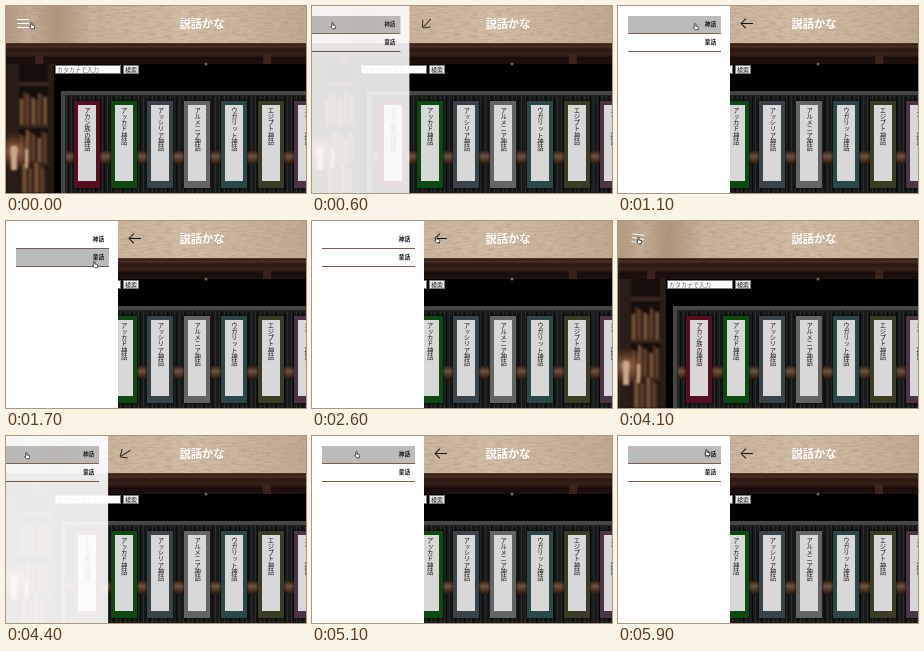
An HTML page that plays this animation: 300 by 187 pixels, repeating every 6 s.

```html
<!DOCTYPE html>
<html lang="ja">
<head>
<meta charset="utf-8">
<title>説話かな</title>
<style>
@property --p { syntax: "<number>"; inherits: true; initial-value: 0; }
html, body { margin: 0; width: 100%; height: 100%; overflow: hidden; background: #000; }
#stage {
  position: relative; width: 300px; height: 187px; overflow: hidden;
  font-family: "Noto Sans CJK JP", "Noto Sans CJK", sans-serif;
  animation: open 6s infinite;
}
#stage > * { position: absolute; }
#scene { left: 0; top: 0; }

h1 {
  left: 146px; top: 9px; width: 100px; margin: 0;
  font-size: 11.2px; line-height: 17px; text-align: center; color: #fff;
}

.field, .button {
  top: 59px; height: 9px; box-sizing: border-box; overflow: hidden;
  border: 1px solid #777; background: #fff;
  font-size: 6px; line-height: 7px; white-space: nowrap;
}
.field { left: 49px; width: 66px; padding-left: 1px; color: #666; }
.button { left: 117px; width: 16px; background: #eee; text-align: center; color: #111; }

.book {
  top: 95px; width: 26px; height: 87px; box-sizing: border-box;
  border: 4px solid var(--c); border-bottom-width: 7px;
  background: #d9d8d9; box-shadow: 0 0 2px 1px #0009;
  writing-mode: vertical-rl; line-height: 18px; padding-top: 2px;
  font-size: 6.3px; white-space: nowrap; color: #171717;
}

#menu {
  left: 0; top: 0; width: 112px; height: 187px; background: #fff;
  opacity: var(--p); transform: translateX(calc((var(--p) - 1) * 112px));
}
.item {
  position: absolute; left: 10px; width: 88px; height: 17px; padding-right: 5px;
  border-bottom: 1px solid #75604f;
  font-size: 5.6px; font-weight: 700; line-height: 17px; text-align: right; color: #181818;
}
.first { top: 10px; animation: hover1 6s infinite; }
.second { top: 28px; animation: hover2 6s infinite; }

#icon {
  left: 11px; top: 11px; width: 12px; height: 12px;
  color: color-mix(in srgb, #111 calc(var(--p) * 100%), #fff);
  transform: translateX(calc(var(--p) * 112px)) rotate(calc(var(--p) * 360deg));
}
#icon i {
  position: absolute; left: 0; top: 5.5px; width: 12px; height: 1px;
  background: currentColor; transform-origin: 0 50%;
  transform: translateY(calc(var(--s) * (1 - var(--p)) * 4px))
    rotate(calc(var(--s) * var(--p) * 45deg))
    scaleX(calc(1 - var(--p) * .42 * var(--s) * var(--s)));
}

#cursor { left: 0; top: 0; animation: point 6s infinite ease-in-out; }

@keyframes open {
  0%, 5.2% { --p: 0; animation-timing-function: ease; }
  13.53%, 54.67% { --p: 1; animation-timing-function: ease; }
  63%, 68% { --p: 0; animation-timing-function: ease; }
  76.33%, 100% { --p: 1; }
}
@keyframes hover1 {
  0%, 6.5% { background: #bbb0; }
  10%, 23% { background: #bbb; }
  27%, 36% { background: #bbb0; }
  39%, 40.5% { background: #bbb; }
  44%, 69% { background: #bbb0; }
  73%, 100% { background: #bbb; }
}
@keyframes hover2 {
  0%, 23% { background: #bbb0; }
  27%, 36% { background: #bbb; }
  40%, 100% { background: #bbb0; }
}
@keyframes point {
  0% { transform: translate(23px, 16px); }
  5%, 13% { transform: translate(18px, 16px); }
  20% { transform: translate(82px, 17px); }
  27%, 33% { transform: translate(86px, 40px); }
  38% { transform: translate(88px, 17px); }
  43% { transform: translate(122px, 15px); }
  50%, 59% { transform: translate(127px, 16px); }
  67%, 78% { transform: translate(18px, 16px); }
  95%, 100% { transform: translate(86px, 13px); }
}
</style>
</head>
<body>
<div id="stage">
  <svg id="scene" width="300" height="187">
    <defs>
      <linearGradient id="cloth">
        <stop offset="0" stop-color="#b39a82"/>
        <stop offset=".08" stop-color="#c5ae97"/>
        <stop offset=".17" stop-color="#ae957d"/>
        <stop offset=".28" stop-color="#c9b39b"/>
        <stop offset=".6" stop-color="#d2bfa8"/>
        <stop offset="1" stop-color="#c2ab93"/>
      </linearGradient>
      <linearGradient id="wood" x2="0" y2="1">
        <stop offset="0" stop-color="#1b0e0a"/>
        <stop offset=".2" stop-color="#4b3026"/>
        <stop offset=".4" stop-color="#2b1812"/>
        <stop offset=".7" stop-color="#38221a"/>
        <stop offset="1" stop-color="#120907"/>
      </linearGradient>
      <linearGradient id="log" x2="0" y2="1">
        <stop offset="0" stop-color="#2e2019"/>
        <stop offset=".4" stop-color="#74543d"/>
        <stop offset="1" stop-color="#241811"/>
      </linearGradient>
      <radialGradient id="glow">
        <stop offset="0" stop-color="#e8b283"/>
        <stop offset=".3" stop-color="#a0694a" stop-opacity=".7"/>
        <stop offset="1" stop-color="#6b3a24" stop-opacity="0"/>
      </radialGradient>
      <pattern id="planks" width="9" height="8" patternUnits="userSpaceOnUse">
        <path fill="#191a1a" d="M0 0h9v8h-9z"/>
        <path stroke="#2b2d2d" d="M2.5 0v8M6.5 0v8"/>
        <path stroke="#0c0c0c" d="M8.5 0v8"/>
      </pattern>
      <filter id="weave" x="0" y="0" width="1" height="1">
        <feTurbulence type="fractalNoise" baseFrequency=".12 .6" numOctaves="2" seed="4"/>
        <feColorMatrix values="0 0 0 0 .38  0 0 0 0 .27  0 0 0 0 .17  1.6 0 0 0 -.6"/>
      </filter>
      <filter id="soft"><feGaussianBlur stdDeviation="1"/></filter>
    </defs>

    <path fill="#160e0b" d="M0 0h300v187H0z"/>
    <g id="shelf" filter="url(#soft)">
      <path fill="#2c1b14" d="M0 57h13v130H0zM42 57h6v130h-6z"/>
      <path fill="#3c261b" d="M13 76h30v4H13zM13 118h30v4H13zM13 156h30v4H13z"/>
    </g>
    <circle cx="8" cy="145" r="20" fill="url(#glow)"/>
    <path fill="#c9a789" filter="url(#soft)" d="M5 140h6v24H5zM19 143h3v19h-3z"/>

    <path fill="url(#wood)" d="M0 37h300v16H0z"/>
    <path fill="#1d100c" d="M0 53h300v5H0z"/>
    <path fill="#3a241b" d="M29 49h8v9h-8zM257 49h8v9h-8z"/>
    <path d="M48 58h252v129H48z"/>
    <circle cx="200" cy="58" r="1.5" fill="#776255"/>

    <path fill="url(#planks)" d="M55 85h245v102H55z"/>
    <path fill="url(#log)" d="M60 145h240v13H60z"/>
    <path fill="none" stroke="#454747" stroke-width="4" d="M300 87H57v100"/>
    <path fill="none" stroke="#222" d="M300 89.5H59.5v98"/>

    <path fill="url(#cloth)" d="M0 0h300v37H0z"/>
    <path filter="url(#weave)" opacity=".6" d="M0 0h300v37H0z"/>
    <path stroke="#6f5139" opacity=".6" d="M0 37.5h300"/>
  </svg>

  <h1>説話かな</h1>
  <div class="field">カタカナで入力</div>
  <div class="button">検索</div>

  <div id="menu">
    <div class="item second">童話</div>
    <div class="item first">神話</div>
  </div>
  <div id="icon"><i style="--s:-1"></i><i style="--s:0"></i><i style="--s:1"></i></div>
  <svg id="cursor" width="7" height="8">
    <path fill="#fff" stroke="#111" stroke-width=".7"
      d="M1.8 4.4V1a.6.6 0 0 1 1.2 0v2l2.2.5q.6.2.5.9l-.4 2.4H2.6L.6 4.6q.4-.7 1.2-.2z"/>
  </svg>
</div>
<script>
const books = [
  ["アカン族の神話", "#590d20"], ["アッカド神話", "#0d4a12"],
  ["アッシリア神話", "#38434a"], ["アルメニア神話", "#636565"],
  ["ウガリット神話", "#294847"], ["エジプト神話", "#3c3c25"],
  ["オセット神話", "#4b3445"]
];
const menu = document.getElementById("menu");
books.forEach(([name, color], i) => {
  const book = document.createElement("div");
  book.className = "book";
  book.textContent = name;
  book.style.left = 68 + i * 36.7 + "px";
  book.style.setProperty("--c", color);
  menu.before(book);
});

// Blurred volumes on the far shelves
const shelf = document.getElementById("shelf");
const tones = ["#6b4630", "#4d3022", "#85603f", "#3a241c"];
for (const base of [118, 156, 187]) {
  for (let x = 14, n = 0; x < 41; x += 3, n++) {
    const tall = 24 + (n * 7 + base) % 9;
    const spine = document.createElementNS("http://www.w3.org/2000/svg", "path");
    spine.setAttribute("d", `M${x} ${base}v${-tall}h2.6v${tall}z`);
    spine.setAttribute("fill", tones[(n * 3 + base) % 4]);
    shelf.append(spine);
  }
}
</script>
</body>
</html>
```
